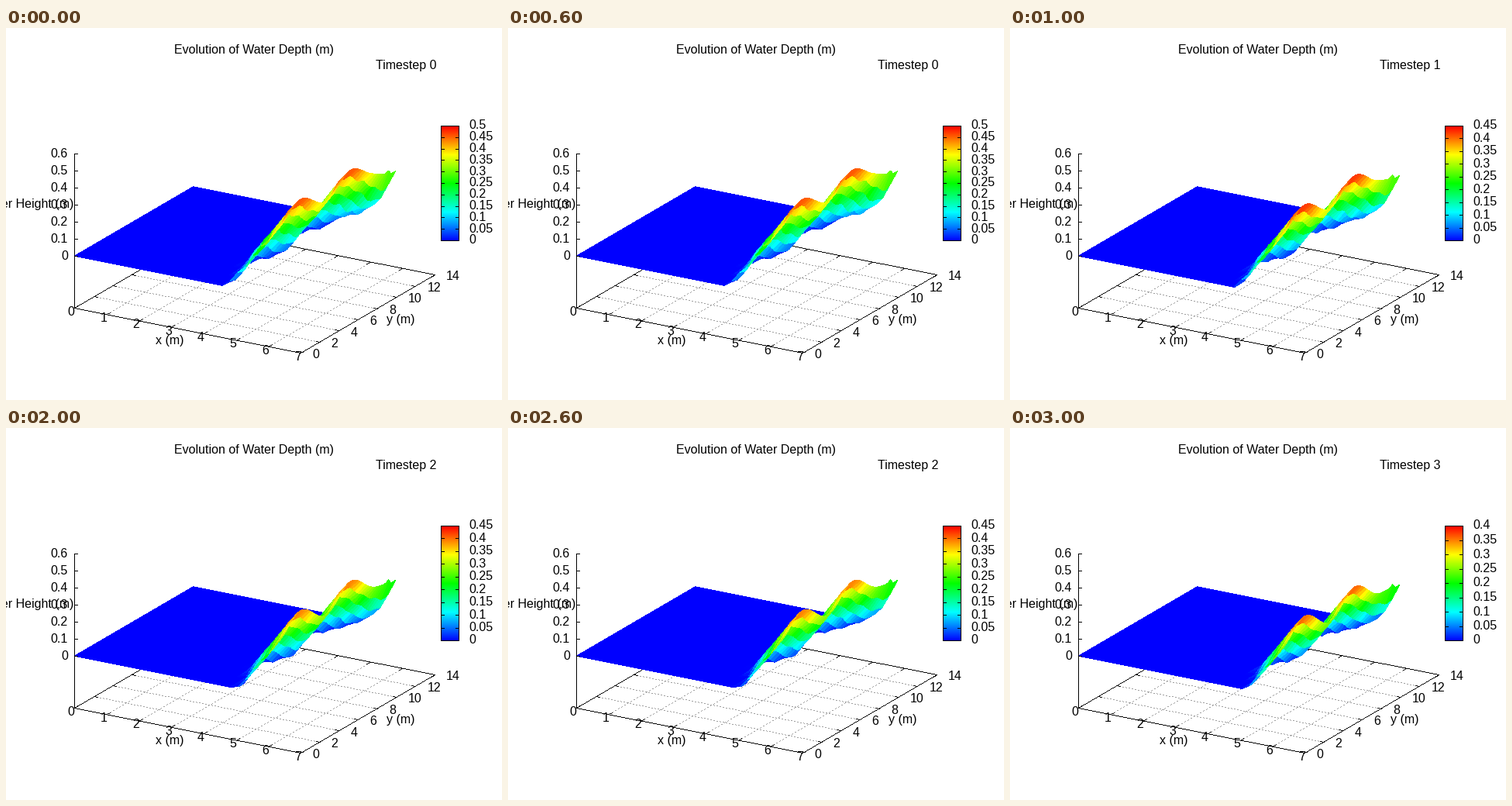
These frames come from a looping animation (640x480 px, 4 s). A matplotlib script:

```python
import numpy as np
import matplotlib.pyplot as plt
from matplotlib.animation import FuncAnimation
from matplotlib.collections import PolyCollection
from matplotlib.colors import LinearSegmentedColormap

plt.rcParams["font.family"] = "Liberation Sans"
W, H, DPI = 640, 480, 80
FONT = 16 * 72 / DPI
X_END, Y_END = 6.26, 12.4
FLOOR = -0.305
STEPS = 4
RAINBOW = LinearSegmentedColormap.from_list(
    "rainbow5", ["#0000ff", "#00ffff", "#00ff00", "#ffff00", "#ff0000"], 1024)
COLOR_MAX = [0.5, 0.45, 0.45, 0.4]

fig = plt.figure(figsize=(W / DPI, H / DPI), dpi=DPI, facecolor="white")
ax = fig.add_axes([0, 0, 1, 1])


def project(x, y, z):
    return 88.5 + 41.71 * x + 12.36 * y, 294.2 + 8.35 * x - 7.21 * y - 220 * z


def label(x, y, text, ha="center"):
    return ax.text(x, y + 5.7, text, ha=ha, va="baseline", fontsize=FONT, zorder=6)


def blank():
    return np.zeros((H, W, 4))


def line(canvas, p, q, gray=0.0, dotted=False):
    """Draw a crisp line, one pixel wide."""
    (x0, y0), (x1, y1) = np.floor(p), np.floor(q)
    count = int(max(abs(x1 - x0), abs(y1 - y0))) + 1
    cols = np.rint(np.linspace(x0, x1, count)).astype(int)
    rows = np.rint(np.linspace(y0, y1, count)).astype(int)
    on = np.arange(count) % 4 < 2 if dotted else slice(None)
    canvas[rows[on], cols[on]] = (gray, gray, gray, 1)


def show(canvas, zorder):
    return ax.imshow(canvas, extent=(0, W, H, 0), interpolation="nearest", zorder=zorder)


def draw_floor():
    canvas = blank()

    def floor_line(x0, y0, x1, y1, **style):
        line(canvas, project(x0, y0, FLOOR), project(x1, y1, FLOOR), **style)

    for x in range(1, 7):
        floor_line(x, 0, x, 14, gray=0.63, dotted=True)
    for y in range(2, 14, 2):
        floor_line(0, y, 7, y, gray=0.63, dotted=True)
    for x in range(8):
        floor_line(x, 0, x, 0.35)
        floor_line(x, 14, x, 13.65)
        px, py = project(x, 0, FLOOR)
        label(px - 4.2, py + 3.6, str(x))
    for y in range(0, 15, 2):
        floor_line(0, y, 0.12, y)
        floor_line(7, y, 6.88, y)
        px, py = project(7, y, FLOOR)
        label(px + 14.5, py + 0.9, str(y), "left")
    corners = [(0, 0), (7, 0), (7, 14), (0, 14), (0, 0)]
    for a, b in zip(corners, corners[1:]):
        floor_line(*a, *b)
    show(canvas, 1)


def draw_front(top):
    """Height axis and the frame and ticks of the colour bar."""
    canvas = blank()
    line(canvas, project(0, 0, FLOOR), project(0, 0, 0.6))
    for i in range(7):
        px, py = project(0, 0, i / 10)
        line(canvas, (px, py), (px + 4, py))
    box = [(561, 126), (584, 126), (584, 274), (561, 274)]
    for a, b in zip(box, box[1:] + box[:1]):
        line(canvas, a, b)
    for i in range(round(top / 0.05) + 1):
        y = bar_row(i * 0.05, top)
        line(canvas, (561, y), (565, y))
        line(canvas, (580, y), (584, y))
    return canvas


def bar_row(value, top):
    return 274.5 - 148 * value / top


def depth(x, y, step):
    """Water depth on a sloping beach; the level drops a little every step."""
    mean = 0.44 - 0.0365 * step
    swell = 0.05 + 0.0035 * step
    crest = np.cos(2 * np.pi * (y - 2.45 - 0.4 * (X_END - x)) / 5.27)
    near = mean + swell * crest - 0.25 * (X_END - x)

    u = np.clip((x - 4.9) / (X_END - 4.9), 0, 1)
    far = 0.05 - 0.027 * step + 0.28 * u ** 2.2
    far = np.where(x < 4.75, np.minimum(far, near), far)
    t = np.clip((y - 9.8) / 2, 0, 1)
    blend = t * t * (3 - 2 * t)
    z = (1 - blend) * near + blend * far

    inside = np.clip(z / 0.08, 0, 1) * np.clip((X_END - x) / 0.3, 0, 1)
    z = z + (0.011 - 0.0015 * step) * inside * np.sin(8 * x) * np.cos(4.8 * y)
    z = z + 0.035 * np.exp(-((y - 11.57) / 0.15) ** 2) * np.clip((x - 6) / 0.26, 0, 1)
    return np.maximum(z, 0)


def cells(a):
    """Four corners of every grid cell, far rows first."""
    quad = np.stack([a[:-1, :-1], a[:-1, 1:], a[1:, 1:], a[1:, :-1]], axis=-1)
    return quad.reshape(-1, 4)


gx, gy = np.meshgrid(np.linspace(0, X_END, 27), np.linspace(Y_END, 0, 51))

draw_floor()
ax.imshow(np.linspace(1, 0, 149)[:, None], cmap=RAINBOW, aspect="auto",
          extent=(561, 585, 275, 126), zorder=4)
front = show(blank(), 5)
label(320, 27, "Evolution of Water Depth (m)")
label(211, 402, "x (m)")
label(509, 375, "y (m)")
label(26.5, 226.5, "Water Height (m)")
for i in range(7):
    label(80, project(0, 0, i / 10)[1] - 0.9, f"{i / 10:g}", "right")
timestep = label(477, 47, "", "left")
bar_labels = [label(597, 0, "", "left") for _ in range(11)]
surface = PolyCollection([], linewidths=0, antialiaseds=False, zorder=3)
ax.add_collection(surface, autolim=False)
ax.set(xlim=(0, W), ylim=(H, 0), aspect="auto")
ax.axis("off")


def update(step):
    z = depth(gx, gy, step)
    top = COLOR_MAX[step]
    px, py = project(gx, gy, z)
    surface.set_verts(np.stack([cells(px), cells(py)], axis=-1))
    surface.set_facecolor(RAINBOW(cells(z).mean(axis=1) / top))
    timestep.set_text(f"Timestep {step}")
    front.set_data(draw_front(top))
    for i, text in enumerate(bar_labels):
        value = i * 0.05
        text.set_text(f"{value:.2g}")
        text.set_y(bar_row(value, top) + 4)
        text.set_visible(value <= top + 1e-6)
    return [surface, timestep, front, *bar_labels]


anim = FuncAnimation(fig, update, frames=STEPS, init_func=lambda: update(0),
                     interval=1000, repeat=True, repeat_delay=0, blit=False)
plt.show()
```
